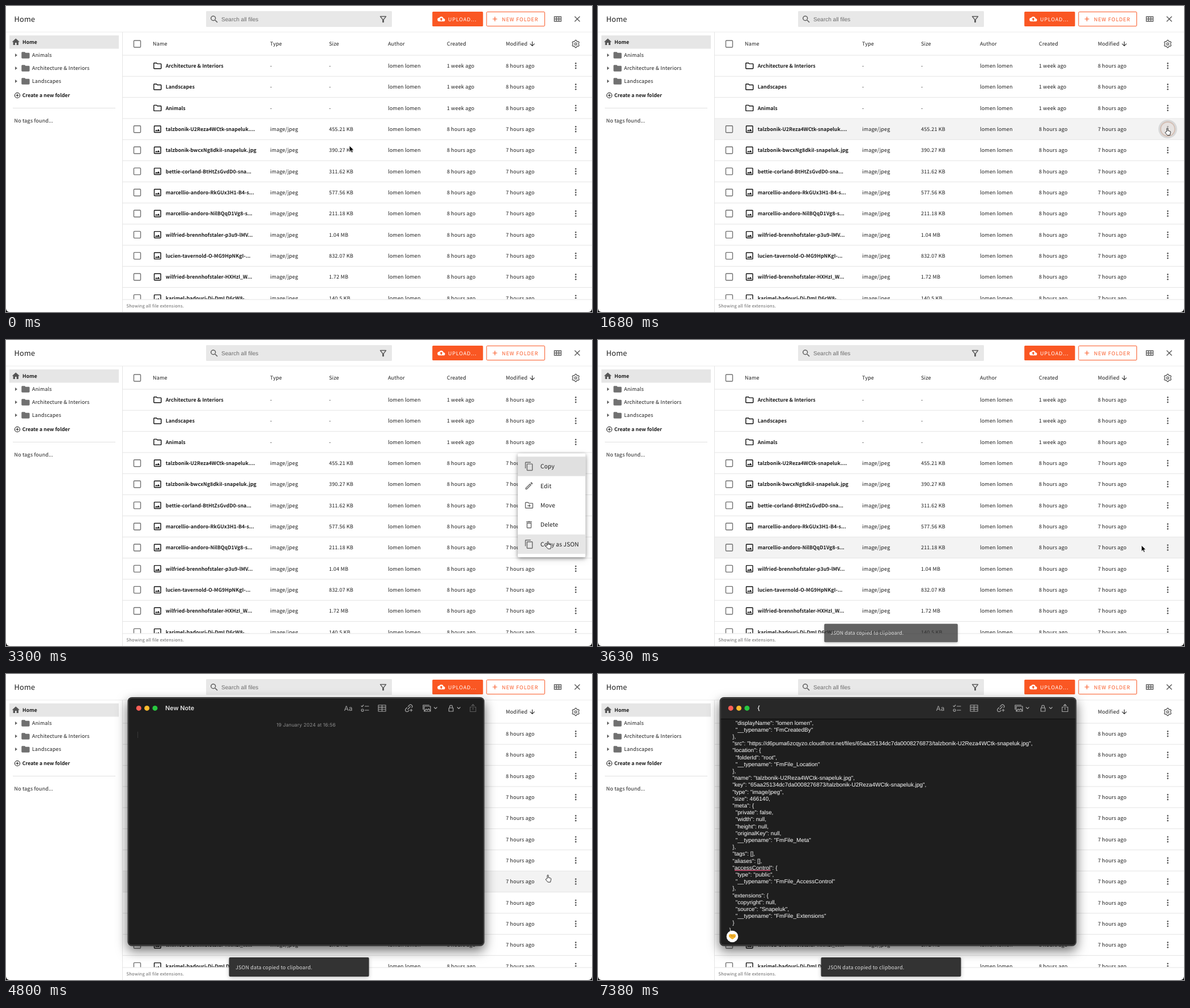
These frames come from a looping animation (1034x541 px, 7410 ms). An HTML page:

```html
<!DOCTYPE html>
<html lang="en">
<head>
<meta charset="utf-8">
<title>File manager</title>
<style>
html, body { margin: 0; height: 100%; overflow: hidden; background: #fff; }
svg { display: block; width: 1034px; height: 541px; }
text { font-family: "Noto Sans CJK SC", "Noto Sans CJK JP", "Noto Sans", sans-serif; text-rendering: geometricPrecision; white-space: pre; }
.arial text, text.arial { font-family: "Liberation Sans", Arial, sans-serif; }
text.inter { font-family: Inter, sans-serif; }
#menu { filter: drop-shadow(0 2px 3px rgba(0,0,0,.35)) drop-shadow(0 3px 6px rgba(0,0,0,.15)); }
#toast { filter: drop-shadow(0 2px 3px rgba(0,0,0,.25)); }
#frame { filter: drop-shadow(0 8px 10px rgba(0,0,0,.58)); }
</style>
</head>
<body>
<svg id="stage" viewBox="0 0 1034 541"></svg>
<script>
const LOOP = 7410, ROW = 37.33, ROW0 = 105.7;
const stage = document.getElementById('stage');

const rect = (x, y, w, h, fill, more = '') =>
  `<rect x="${x}" y="${y}" width="${w}" height="${h}" fill="${fill}" ${more}/>`;
const line = (x1, y1, x2, y2, color) =>
  `<path d="M${x1} ${y1}L${x2} ${y2}" stroke="${color}"/>`;
const circle = (x, y, r, fill, more = '') => `<circle cx="${x}" cy="${y}" r="${r}" fill="${fill}" ${more}/>`;
const stroke = (d, color, w = 1, more = '') =>
  `<path d="${d}" fill="none" stroke="${color}" stroke-width="${w}" stroke-linecap="round" stroke-linejoin="round" ${more}/>`;
// y is the middle of the capitals
const text = (x, y, s, { size = 9, weight = 400, fill = '#1c1c1c', gap = .18, cls = '', more = '' } = {}) =>
  `<text x="${x}" y="${y + size * .37}" font-size="${size}" font-weight="${weight}" fill="${fill}" letter-spacing="${gap}" class="${cls}" ${more}>${s.replace(/&/g, '&amp;')}</text>`;
const bold = { weight: 600, gap: 0, size: 8.85 };

const icons = {
  home: 'M10 20v-6h4v6h5v-8h3L12 3 2 12h3v8z',
  folder: 'M10 4H4c-1.1 0-2 .9-2 2v12c0 1.1.9 2 2 2h16c1.1 0 2-.9 2-2V8c0-1.1-.9-2-2-2h-8z',
  folderLine: 'M9.2 6l2 2H20v10H4V6zM10 4H4c-1.1 0-2 .9-2 2v12c0 1.1.9 2 2 2h16c1.1 0 2-.9 2-2V8c0-1.1-.9-2-2-2h-8z',
  image: 'M19 5v14H5V5zM19 3H5c-1.1 0-2 .9-2 2v14c0 1.1.9 2 2 2h14c1.1 0 2-.9 2-2V5c0-1.1-.9-2-2-2zM14.1 11.9l-3 3.9L9 13.1 6 17h12z',
  search: 'M15.5 14h-.8l-.3-.3A6.5 6.5 0 1 0 13.7 14.4l.3.3v.8l5 5 1.5-1.5zM9.5 14a4.5 4.5 0 1 1 0-9 4.5 4.5 0 0 1 0 9z',
  filter: 'M7 6h10l-5 6.3zM4.2 5.6L10 13v6c0 .6.4 1 1 1h2c.6 0 1-.4 1-1v-6l5.7-7.4c.5-.7 0-1.6-.8-1.6H5c-.8 0-1.3 1-.8 1.6z',
  cloud: 'M19.4 10A7.5 7.5 0 0 0 5.4 8 6 6 0 0 0 6 20h13a5 5 0 0 0 .4-10zM14 13v4h-4v-4H7l5-5 5 5z',
  add: 'M19 13h-6v6h-2v-6H5v-2h6V5h2v6h6z',
  addCircle: 'M13 7h-2v4H7v2h4v4h2v-4h4v-2h-4zM12 2a10 10 0 1 0 0 20 10 10 0 0 0 0-20zM12 20a8 8 0 1 1 0-16 8 8 0 0 1 0 16z',
  close: 'M19 6.4L17.6 5 12 10.6 6.4 5 5 6.4 10.6 12 5 17.6 6.4 19 12 13.4 17.6 19 19 17.6 13.4 12z',
  down: 'M20 12l-1.4-1.4L13 16.2V4h-2v12.2l-5.6-5.6L4 12l8 8z',
  grid: 'M2 5v14h20V5zM4 7h4v4H4zM10 7h4v4h-4zM16 7h4v4h-4zM4 13h4v4H4zM10 13h4v4h-4zM16 13h4v4h-4z',
  copy: 'M16 1H4c-1.1 0-2 .9-2 2v14h2V3h12zM19 5H8c-1.1 0-2 .9-2 2v14c0 1.1.9 2 2 2h11c1.1 0 2-.9 2-2V7c0-1.1-.9-2-2-2zM19 21H8V7h11z',
  edit: 'M14 9l1 1-9 9H5v-1zM17.7 3a1 1 0 0 0-.7.3l-1.9 1.8 3.8 3.8 1.8-1.9c.4-.4.4-1 0-1.4l-2.3-2.3a1 1 0 0 0-.7-.3zM14 6.2l-11 11V21h3.8l11-11z',
  trash: 'M16 9v10H8V9zM14.5 3h-5l-1 1H5v2h14V4h-3.5zM18 7H6v12c0 1.1.9 2 2 2h8c1.1 0 2-.9 2-2z'
};
icons.move = icons.folderLine + 'M12 17l4-4-4-4v3H8v2h4z';
const icon = (name, x, y, fill = '#5a5a5a', size = 17.2) =>
  `<path d="${icons[name]}" fill="${fill}" fill-rule="evenodd" transform="translate(${x - size / 2} ${y - size / 2}) scale(${size / 24})"/>`;

function gear(x, y) {
  const points = [];
  for (let i = 0; i < 24; i++) {
    const r = i % 4 < 2 ? 6.6 : 5, a = (i + 1.5) * Math.PI / 12;
    points.push((x + r * Math.cos(a)).toFixed(1) + ' ' + (y + r * Math.sin(a)).toFixed(1));
  }
  return stroke('M' + points.join('L') + 'z', '#5a5a5a', 1.3) + circle(x, y, 1.9, 'none', 'stroke="#5a5a5a" stroke-width="1.3"');
}
const checkbox = y => rect(225.5, y - 6, 12, 12, '#fff', 'rx="1.3" fill-opacity="0" stroke="#707070" stroke-width="1.4"');

const header = () =>
  text(14.5, 23, 'Home', { size: 12.86 }) +
  rect(353, 9, 328, 28, '#e8e8e8', 'rx="1.5"') + icon('search', 367.5, 23.5) + icon('filter', 665.5, 23.5) +
  text(380, 23.3, 'Search all files', { size: 10.05, fill: '#6c6c6c', gap: 0, cls: 'arial' }) +
  rect(752.3, 10.1, 89.4, 25.8, '#fa5723', 'rx="1.5"') + icon('cloud', 768, 23, '#fff', 13) +
  text(780, 23.2, 'UPLOAD...', { fill: '#fff', weight: 500, gap: .9 }) +
  rect(848, 10.4, 102.6, 25.2, '#fff', 'rx="1.5" stroke="#fa5723"') + icon('add', 862.7, 23, '#fa5723', 13.5) +
  text(875, 23.2, 'NEW FOLDER', { fill: '#fa5723', weight: 500, gap: .9 }) +
  icon('grid', 973.5, 23, '#5a5a5a', 16) + icon('close', 1008, 23);

const sidebar = () =>
  rect(6, 52, 193, 23.5, '#e6e6e6') + icon('home', 17.3, 63.6, '#555', 16) + text(29, 64, 'Home', bold) +
  ['Animals', 'Architecture & Interiors', 'Landscapes'].map((s, i) => {
    const y = 87 + 23 * i;
    return `<path d="M16 ${y - 3}l4 3-4 3z" fill="#666"/>` + icon('folder', 34.5, y, '#707070') + text(46, y, s);
  }).join('') +
  icon('addCircle', 20, 158, '#111', 12.2) + text(28.7, 158, 'Create a new folder', bold) +
  line(12, 180.5, 193, 180.5, '#e0e0e0') + text(14.5, 202.5, 'No tags found...');

const folders = ['Architecture & Interiors', 'Landscapes', 'Animals'];
const files = [
  ['talzbonik-U2Reza4WCtk-snapeluk....', '455.21 KB'],
  ['talzbonik-bwcxNg8dkiI-snapeluk.jpg', '390.27 KB'],
  ['bettie-corland-BtHtZsGvdD0-sna...', '311.62 KB'],
  ['marcellio-andoro-RkGUx3H1-B4-s...', '577.56 KB'],
  ['marcellio-andoro-NilBQqD1Vg8-s...', '211.18 KB'],
  ['wilfried-brennhofstaler-p3u9-lMV...', '1.04 MB'],
  ['lucien-tavernold-O-MG9HpNKgI-...', '832.07 KB'],
  ['wilfried-brennhofstaler-HXHzI_W...', '1.72 MB'],
  ['karimel-badouri-Di-DmLD6cW8-...', '140.5 KB']
];
function row(i) {
  const y = ROW0 + ROW * i, isFolder = i < 3, file = files[i - 3];
  const [name, type, size] = isFolder ? [folders[i], '-', '-'] : [file[0], 'image/jpeg', file[1]];
  return (isFolder ? '' : checkbox(y)) + icon(isFolder ? 'folderLine' : 'image', 267.3, y, '#111') +
    text(281.7, y, name, bold) + text(466, y, type) + text(570, y, size) + text(674, y, 'lomen lomen') +
    text(778, y, isFolder ? '1 week ago' : '8 hours ago') + text(882, y, isFolder ? '8 hours ago' : '7 hours ago') +
    [-4.3, 0, 4.3].map(d => circle(1005.3, y + d, 1.4, '#5a5a5a')).join('') +
    line(206, y + 18.6, 1034, y + 18.6, '#e4e4e4');
}
const table = () =>
  `<rect id="hover" x="206" width="828" height="36.8" fill="#f3f3f3"/>` +
  line(0, 46, 1034, 46, '#ececec') + line(205.5, 46, 205.5, 541, '#e4e4e4') + checkbox(67) +
  [[259, 'Name'], [466, 'Type'], [570, 'Size'], [674, 'Author'], [778, 'Created'], [882, 'Modified']]
    .map(([x, s]) => text(x, 67, s, { weight: 500 })).join('') +
  icon('down', 928.6, 67, '#222', 13) + gear(1005.3, 67) + line(206, 87, 1034, 87, '#e4e4e4') +
  Array.from({ length: 12 }, (_, i) => row(i)).join('') +
  rect(206, 518.5, 828, 23, '#fff') + line(206, 519, 1034, 519, '#e4e4e4') +
  text(212.5, 530, 'Showing all file extensions.', { size: 7.7, fill: '#666' });

const menu = () => {
  const items = [['copy', 'Copy'], ['edit', 'Edit'], ['move', 'Move'], ['trash', 'Delete'], ['copy', 'Copy as JSON']];
  return `<g id="menu">` + rect(903, 200.5, 119.5, 183.5, '#fff', 'rx="2"') + rect(903, 206.2, 119.5, 34.4, '#e0e0e0') +
    `<rect id="item" x="903" width="119.5" height="34.4" fill="#f5f5f5"/>` +
    items.map(([name, s], i) => icon(name, 923, 223.4 + 34.4 * i, '#6a6a6a') +
      text(943, 223.4 + 34.4 * i, s, { size: 10.3, gap: .1 })).join('') + '</g>';
};

const toast = () => `<g id="toast">` + rect(393.5, 501, 247, 34, '#333', 'rx="2"') +
  text(405, 518.3, 'JSON data copied to clipboard.', { fill: '#dedede' }) + '</g>';

const json = `    "displayName": "lomen lomen",
    "__typename": "FmCreatedBy"
  },
  "src": "https://d6puma6zcqyzo.cloudfront.net/files/65aa25134dc7da0008276873/talzbonik-U2Reza4WCtk-snapeluk.jpg",
  "location": {
    "folderId": "root",
    "__typename": "FmFile_Location"
  },
  "name": "talzbonik-U2Reza4WCtk-snapeluk.jpg",
  "key": "65aa25134dc7da0008276873/talzbonik-U2Reza4WCtk-snapeluk.jpg",
  "type": "image/jpeg",
  "size": 466140,
  "meta": {
    "private": false,
    "width": null,
    "height": null,
    "originalKey": null,
    "__typename": "FmFile_Meta"
  },
  "tags": [],
  "aliases": [],
  "accessControl": {
    "type": "public",
    "__typename": "FmFile_AccessControl"
  },
  "extensions": {
    "copyright": null,
    "source": "Snapeluk",
    "__typename": "FmFile_Extensions"
  }
}`;

const toolbar = () => {
  const c = '#a8a8a8';
  return text(596.5, 60.2, 'Aa', { size: 11.8, fill: c, gap: 0, cls: 'inter' }) +
    stroke('M627 56.5l1.3 1.3 2.4-2.8M633.5 57h6.5M633.5 64h6.5', c, 1.2) + circle(629, 64, 2, 'none', `stroke="${c}" stroke-width="1.1"`) +
    stroke('M657 55h13v11h-13zM657 58.6h13M657 62.3h13M663.5 55v11', c, 1.1) +
    stroke('M709 62.5l4.5-4.8M707.5 59.5l-2 2a3 3 0 0 0 4.2 4.3l1.4-1.4M709.5 57.5l2.2-2.3a3 3 0 0 1 4.3 4.2M713 64h4M715 62v4', c, 1.2) +
    stroke('M736 62.5v-7.5h10.5M738 57h11v9h-11zM738.5 65l3-3 2 1.8 2-2.3 3 3', c, 1.2) +
    stroke('M755.5 59l2.4 2.4 2.4-2.4M796.5 59l2.4 2.4 2.4-2.4', c, 1.2) +
    stroke('M781.5 60h7.5v6h-7.5zM783 60v-2.5a2.2 2.2 0 0 1 4.5 0v2.5', c, 1.2) +
    stroke('M821.5 58.5h-2.5v8h10v-8h-2.5M824 63v-9M821.4 56.3l2.6-2.6 2.6 2.6', c, 1.1, 'id="share"');
};
const note = () => `<g id="note">` +
  rect(214.6, 41, 629.6, 440, '#161616', 'id="frame" rx="7.5"') + rect(215.5, 42, 628, 438, '#1e1e1e', 'rx="6.5"') +
  `<path id="bar" d="M215.5 79V48.5a6.5 6.5 0 0 1 6.5-6.5h615a6.5 6.5 0 0 1 6.5 6.5V79z" fill="#282828"/>` +
  ['#fe5f57', '#febc2e', '#28c840'].map((c, i) => circle(234.3 + 14.3 * i, 60.4, 4.5, c)).join('') + toolbar() +
  `<g id="blank">` + text(281, 60, 'New Note', { size: 10.8, weight: 600, fill: '#e4e4e4', gap: 0, cls: 'inter' }) +
  text(529.5, 90.3, '19 January 2024 at 16:56', { size: 8.6, fill: '#8c8c8c', gap: .1, cls: 'inter', more: 'text-anchor="middle"' }) +
  line(232.5, 102, 232.5, 113, '#383838') + `</g><g id="filled" class="arial">` + line(216, 79.5, 843, 79.5, '#0c0c0c') +
  text(281, 60, '{', { size: 10.8, weight: 600, fill: '#e4e4e4', gap: 0, cls: 'inter' }) +
  json.split('\n').map((s, i) => text(231.6 + 2.78 * s.search(/\S/), 85.8 + 12.2 * i, s.trim(), { size: 10, fill: '#fff', gap: 0 })).join('') +
  `<path id="spell" d="M241 347.3h63.5" stroke="#d8557a" stroke-width="1.6"/>` +
  `<path id="caret" d="M235 446v12" stroke="#e6b93c" stroke-width="1.5"/></g>` +
  rect(216, 42.5, 627, 437, 'none', 'rx="6" stroke="#5c5c5c"') +
  `<g id="badge"><g id="tips"><rect id="pill" y="452" height="25" rx="9" fill="#2e3033"/><g id="bulb">` +
  circle(215.2, 462.6, 5.2, '#16b894') + stroke('M213.3 469h3.8M214 471.3h2.4', '#16b894', 1.4) +
  circle(205.3, 471.5, .6, '#999') + circle(205.3, 474, .6, '#999') + '</g>' + circle(237, 464, 10, '#12a88e') + '</g>' +
  `<g id="mood">` + circle(237, 464, 10.3, '#fff') +
  `<path d="M231 461l3-1.4 3 .9 3-.9 3 1.4v3.6l-4.5 4-2 .4-4.5-3.4-1-1z" fill="#f3b32e"/>` +
  stroke('M237 460.7l-2.2 2.3 2 .8 1.6-1 3.4 3', '#b97a14', .7) + '</g></g></g>';

const cursors = () => `<g id="cursor">` +
  `<path id="arrow" d="M0 0v10.8l2.5-2.3 1.7 3.8 1.9-.8-1.7-3.7h3.4z" fill="#000" stroke="#fff" stroke-width=".8"/>` +
  `<path id="hand" transform="translate(-4.2 -4)" d="M3.3 6.5V1.3a1 1 0 0 1 2 0V5l3.3.7q1.6.4 1.4 2L9.4 10.5 8.8 13H4.4L.9 9Q0 7.6 1.4 7.3z" fill="#fff" stroke="#111" stroke-width=".9"/>` +
  `<g id="beam">` + stroke('M-2.2-5.5q2.2 0 2.2 1.7v7.6q0 1.7-2.2 1.7M2.2-5.5q-2.2 0-2.2 1.7M0 3.8q0 1.7 2.2 1.7M-1.4.8h2.8', '#fff', 1.4) + '</g></g>';

stage.innerHTML = header() + sidebar() + table() +
  `<g id="press">` + circle(1005.3, 217.5, 16.5, '#000', 'fill-opacity=".11"') +
  circle(1005.3, 217.5, 12.5, '#f3ebe7', 'fill-opacity=".5" stroke="#d3bdb2" stroke-width="1.8"') + '</g>' +
  menu() + note() + toast() + cursors() +
  `<path d="M0 535v6h7q-6 0-7-6zM1034 535v6h-7q6 0 7-6z" fill="#111"/>`;

const $ = id => document.getElementById(id);
const show = (id, on) => $(id).setAttribute('opacity', +on);
const ramp = (t, a, b) => Math.min(1, Math.max(0, (t - a) / (b - a)));

const inOut = p => p * p * (3 - 2 * p), start = p => p * p * (2 - p), end = p => 1 - (1 - p) ** 2;
// time, x, y, easing on the way there
const path = [
  [30, 606, 247], [750, 985, 223, inOut], [1500, 1004.5, 219.5, inOut], [2190, 1004.5, 219.5, inOut],
  [2520, 950, 316, start], [2850, 956, 360, end], [3270, 956, 360, end], [3480, 959, 363, inOut],
  [4110, 959, 363, inOut], [4200, 956, 359, inOut], [4800, 956, 359, inOut], [5430, 553, 248, inOut]
];
function pointer(t) {
  const i = path.findIndex(k => k[0] > t);
  if (i < 0) return path[path.length - 1].slice(1, 3);
  if (!i) return path[0].slice(1, 3);
  const [a, b] = [path[i - 1], path[i]], e = b[3](ramp(t, a[0], b[0]));
  return [a[1] + (b[1] - a[1]) * e, a[2] + (b[2] - a[2]) * e];
}

function draw(t) {
  const [x, y] = pointer(t), inNote = t > 4800 && x < 843;
  const shape = inNote ? 'beam' : (t > 1400 && t < 3450) || t >= 4530 ? 'hand' : 'arrow';
  for (const id of ['arrow', 'hand', 'beam']) show(id, id === shape);
  $('cursor').setAttribute('transform', `translate(${x} ${y})`);
  show('cursor', t < 5700);

  const first = t >= 1680 && t < 1860;
  $('hover').setAttribute('y', ROW0 + ROW * (first ? 3 : 7) - 18.4);
  show('hover', first || (t >= 3390 && !inNote));
  show('press', t >= 1680 ? 1 - ramp(t, 1830, 1980) : 0);

  const open = end(ramp(t, 1740, 1860)), scale = .8 + .2 * open;
  $('menu').setAttribute('transform', `translate(1022 200) scale(${scale}) translate(-1022 -200)`);
  show('menu', open * (1 - ramp(t, 3330, 3420)));
  const item = Math.floor((pointer(t - 60)[1] - 206.2) / 34.4);
  $('item').setAttribute('y', 206.2 + 34.4 * item);
  $('item').setAttribute('fill', t >= 3270 ? '#e6e6e6' : '#f5f5f5');
  show('item', item > 0);

  const pop = 1 - (1 - ramp(t, 3585, 3735)) ** 4;
  $('toast').setAttribute('transform', `translate(517 518) scale(${.8 + .2 * pop}) translate(-517 -518)`);
  show('toast', pop);

  const pasted = t >= 5550, fold = inOut(ramp(t, 5970, 6120));
  show('note', ramp(t, 4740, 4800));
  show('blank', !pasted);
  show('filled', pasted);
  show('bar', pasted);
  show('share', pasted ? 1 : .45);
  show('badge', pasted);
  $('pill').setAttribute('x', 202 + 23 * fold);
  $('pill').setAttribute('width', 46.5 - 23 * fold);
  show('bulb', 1 - fold);
  const mood = ramp(t, 6120, 6240);
  show('mood', mood);
  show('tips', 1 - mood);
  show('spell', ramp(t, 6330, 6450));
  show('caret', t < 6300 || (t >= 6750 && t < 7380));
}

function tick() {
  draw(performance.now() % LOOP);
  requestAnimationFrame(tick);
}
tick();
</script>
</body>
</html>
```
